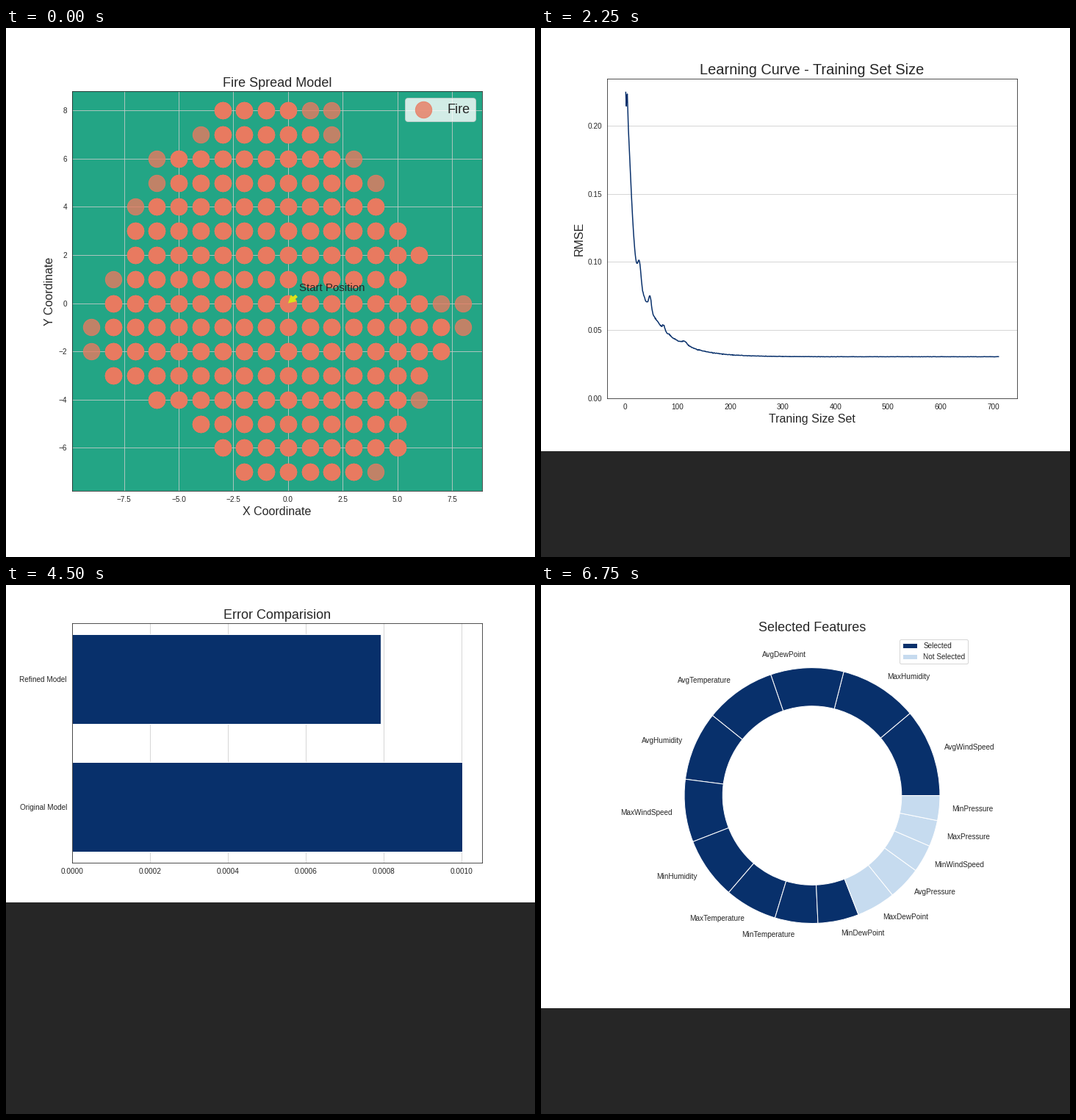
A matplotlib script for the animation above (7.5 s loop, 720 by 720 pixels).

```python
import numpy as np
import matplotlib.pyplot as plt
from matplotlib.animation import FuncAnimation
from matplotlib.patches import Polygon, Rectangle

INK, NAVY, PALE, RED = "#262626", "#08306b", "#c6dbef", "#db5a62"
GREEN, FLAME = "#23a585", "#e97a60"
SIZE = 720

plt.rcParams.update({
    "font.family": "Liberation Sans", "font.size": 10,
    "text.color": INK, "axes.labelcolor": INK, "axes.edgecolor": INK,
    "xtick.color": INK, "ytick.color": INK,
    "axes.linewidth": 0.8, "axes.axisbelow": True,
    "axes.titlesize": 18, "axes.titlepad": 6, "axes.labelsize": 16,
    "xtick.major.size": 0, "ytick.major.size": 0,
    "xtick.major.pad": 7, "ytick.major.pad": 7,
    "grid.color": "#cccccc", "grid.linewidth": 0.8,
    "lines.linewidth": 1.5,
})

fig = plt.figure(figsize=(10, 10), dpi=72, facecolor="white")
band = Rectangle((0, 0), 1, 0, transform=fig.transFigure,
                 facecolor=INK, edgecolor="none", zorder=10)
fig.add_artist(band)
scenes = []


def through(x, *knots):
    """Straight segments through a few (x, y) points."""
    return np.interp(x, *zip(*knots))


def add_scene(title, height=576, grid="both", xlabel="", ylabel="", size=18):
    """Axes laid out for a page of the given pixel height at the top."""
    bottom = SIZE - 0.875 * height
    ax = fig.add_axes([0.125, bottom / SIZE, 0.775, 0.755 * height / SIZE],
                      label=f"scene{len(scenes)}")
    ax.set_title(title, fontsize=size)
    ax.set_xlabel(xlabel)
    ax.set_ylabel(ylabel)
    if grid:
        ax.grid(True, axis=grid)
    scenes.append((ax, height))
    return ax


def set_scale(ax, xlim, ylim, xticks=None, yticks=None):
    if xticks is not None:
        ax.set_xticks(xticks)
    if yticks is not None:
        ax.set_yticks(yticks)
    ax.set_xlim(*xlim)
    ax.set_ylim(*ylim)


def draw_fire():
    ax = add_scene("Fire Spread Model", 720,
                   xlabel="X Coordinate", ylabel="Y Coordinate")
    ax.set_facecolor(GREEN)
    # The burnt area lies between two bent edges; some rows have just grown.
    fresh_left = {7, 6, 5, 4, 1, -1, -2}
    fresh_right = {8, 7, 6, 5, 0, -1, -4, -7}
    burning, older = [], []
    for y in range(-7, 9):
        a = round(through(y, (-7, -2), (-5, -4), (-2, -9.27),
                          (6, -5.71), (8, -2.6)))
        b = round(through(y, (-7, 4.3), (-3, 6.4), (0, 8.4),
                          (1, 5.4), (2, 5.6), (8, 1.6)))
        burning += [(x, y) for x in range(a, b + 1)]
        a += y in fresh_left
        b -= (y in fresh_right) * (2 if y in (0, 8) else 1)
        older += [(x, y) for x in range(a, b + 1)]
    for i, cells in enumerate([burning] + [older] * 3):
        ax.scatter(*zip(*cells), s=500, color=FLAME, alpha=0.8,
                   label=None if i else "Fire", zorder=2)
    arrow = [(0, 0), (.40, .08), (.32, .16), (.44, .26),
             (.34, .36), (.22, .265), (.13, .35)]
    ax.add_patch(Polygon(arrow, facecolor="#dbe31a", edgecolor="none", zorder=4))
    ax.text(0.5, 0.5, "Start Position", fontsize=15, zorder=5)
    set_scale(ax, (-9.875, 8.875), (-7.787, 8.787),
              np.arange(-7.5, 8, 2.5), np.arange(-6, 9, 2))
    ax.legend(loc="upper right", fontsize=18)


def draw_control(title, xlabel, ylabel, x, fit, xmax, step):
    ax = add_scene(title, xlabel=xlabel, ylabel=ylabel)
    rate = np.linspace(0.25, 0, len(x))
    ax.scatter(x, rate, c=x, cmap="viridis", s=60, alpha=0.7)
    ax.plot(x, fit(x), color=RED, label="Bestfit Line")
    set_scale(ax, (0, xmax), (0, 0.2738),
              np.arange(0, xmax, step), np.arange(0, 0.26, 0.05))
    ax.legend(loc="upper right")


def draw_learning():
    ax = add_scene("Learning Curve - Training Set Size", grid="y",
                   xlabel="Traning Size Set", ylabel="RMSE", size=20)
    n = np.arange(1, 711)
    rmse = 30.5 + 105 * np.exp(-(n / 13) ** 2) + 92.6 * np.exp(-n / 48)
    # Bumps: place, height, width
    for at, high, wide in [(2, -8, .5), (4, 12, .8), (27, 16, 3),
                           (47, 10, 2.5), (73, 3, 2), (113, 2.5, 5)]:
        rmse += high * np.exp(-((n - at) / wide) ** 2 / 2)
    noise = np.random.default_rng(4).normal(size=n.size)
    rmse += noise * (0.05 + 0.5 * np.exp(-n / 90)) * (n > 30)
    ax.plot(n, rmse / 1000, color=NAVY)
    set_scale(ax, (-34.45, 745.45), (0, 0.2344),
              np.arange(0, 701, 100), np.arange(0, 0.21, 0.05))


def draw_feature_curve():
    ax = add_scene("Learning Curve - Number of Features", grid="y",
                   xlabel="Number of Features", ylabel="RMSE")
    n = np.arange(1, 16)
    ax.plot(n, 0.0305 + 0.014 * np.exp(-(n - 1) / 2.5), color=NAVY)
    set_scale(ax, (0.3, 15.7), (0, 0.055),
              np.arange(2, 15, 2), np.arange(0, 0.051, 0.01))


def draw_coefficients():
    ax = add_scene("Coeficients of the final model")
    names = ["MaxTemperature", "MaxHumidity", "AvgHumidity", "MinTemperature",
             "MinHumidity", "AvgWindSpeed", "AvgTemperature", "AvgDewPoint",
             "MaxWindSpeed", "MaxDewPoint"]
    x = np.arange(len(names))
    coefs = through(x, (0, 4.37), (1, 2.27), (2, 1.95), (3, 1.15), (5, .48),
                    (6, -.47), (7, -.98), (8, -1.09), (9, -2.77))
    ax.bar(x, coefs / 1000, color=NAVY, edgecolor="white")
    ax.set_xticks(x, names, rotation=90)
    set_scale(ax, (-0.89, 9.89), (-0.003134, 0.004745),
              yticks=np.arange(-3, 5) / 1000)


def draw_errors():
    ax = add_scene("Error Comparision", 432, grid="x")
    ax.barh([0, 1], [0.0010024, 0.000793], height=0.7,
            color=NAVY, edgecolor="white")
    ax.set_yticks([0, 1], ["Original Model", "Refined Model"])
    set_scale(ax, (0, 0.0010525), (-0.435, 1.435), np.arange(0, 11, 2) / 10000)


def draw_importances():
    ax = add_scene("Feature Importances with standard deviation",
                   grid="y", size=20)
    names = ["AvgWindSpeed", "AvgHumidity", "AvgDewPoint", "AvgTemperature",
             "MaxHumidity", "MaxTemperature", "MaxWindSpeed", "MinHumidity",
             "MaxDewPoint", "MinTemperature", "MinDewPoint", "AvgPressure",
             "MinWindSpeed", "MinPressure", "MaxPressure"]
    x = np.arange(len(names))
    mean = through(x, (0, 122), (1, 111), (2, 91), (4, 80), (7, 70.4),
                   (8, 54), (9, 53.7), (10, 47.6), (12, 42.5), (13, 28.8),
                   (14, 22))
    std = np.array([38, 48, 31, 31, 42, 29, 37, 55, 37, 36, 48, 31, 16, 27, 22])
    ax.bar(x, mean / 1000, yerr=std / 1000, color=NAVY, edgecolor="white",
           error_kw={"ecolor": "black", "elinewidth": 1.6})
    ax.set_xticks(x, names, rotation=90)
    set_scale(ax, (-1.14, 15.14), (-0.00855, 0.1685),
              yticks=np.arange(0, 0.17, 0.02))


def draw_ring(title, colors, legend=False):
    ax = add_scene(title, grid=None)
    names = ["AvgWindSpeed", "MaxHumidity", "AvgDewPoint", "AvgTemperature",
             "AvgHumidity", "MaxWindSpeed", "MinHumidity", "MaxTemperature",
             "MinTemperature", "MinDewPoint", "MaxDewPoint", "AvgPressure",
             "MinWindSpeed", "MaxPressure", "MinPressure"]
    shares = through(np.arange(len(names)), (0, 40), (1, 35.6), (2, 33.2),
                     (4, 31.4), (5, 28.5), (6, 28.1), (8, 19.5), (10, 17.7),
                     (12, 12.6), (14, 11.3))
    wedges, _ = ax.pie(shares, labels=names, colors=colors,
                       wedgeprops={"width": 0.3, "edgecolor": "white"},
                       textprops={"fontsize": 10})
    if legend:
        ax.legend([wedges[0], wedges[-1]], ["Selected", "Not Selected"],
                  loc="upper right")


step = np.arange(25)
acres = through(step, (0, 71), (1, 94), (5, 141), (7, 156), (11, 249),
                (12, 350), (13, 367), (15, 477), (17, 530), (18, 647),
                (19, 682), (21, 845), (24, 1024))
days = 3 + 31.3 * (step / 24) ** 1.7

draw_fire()
draw_control("Control Rate vs. Acres Burned", "Acres Burned", "Control Rates",
             acres, lambda x: 0.2927 * np.exp(-0.00239 * x) - 0.01, 1071.7, 100)
draw_control("Control Rate vs. Time Burned", "Time Burned", "Control Rate",
             days, lambda x: 0.31 * np.exp(-0.068 * x) - 0.015, 36, 5)
draw_learning()
draw_feature_curve()
draw_coefficients()
draw_errors()
draw_importances()
draw_ring("Feature Importances", plt.cm.Blues(np.linspace(0.95, 0.2, 15)))
draw_ring("Selected Features", [NAVY] * 10 + [PALE] * 5, legend=True)


def show_scene(k):
    for i, (ax, height) in enumerate(scenes):
        ax.set_visible(i == k)
    band.set_height(1 - scenes[k][1] / SIZE)
    return []


anim = FuncAnimation(fig, show_scene, frames=len(scenes), interval=750,
                     init_func=lambda: show_scene(0), repeat=True,
                     repeat_delay=0, blit=False)
plt.show()
```
